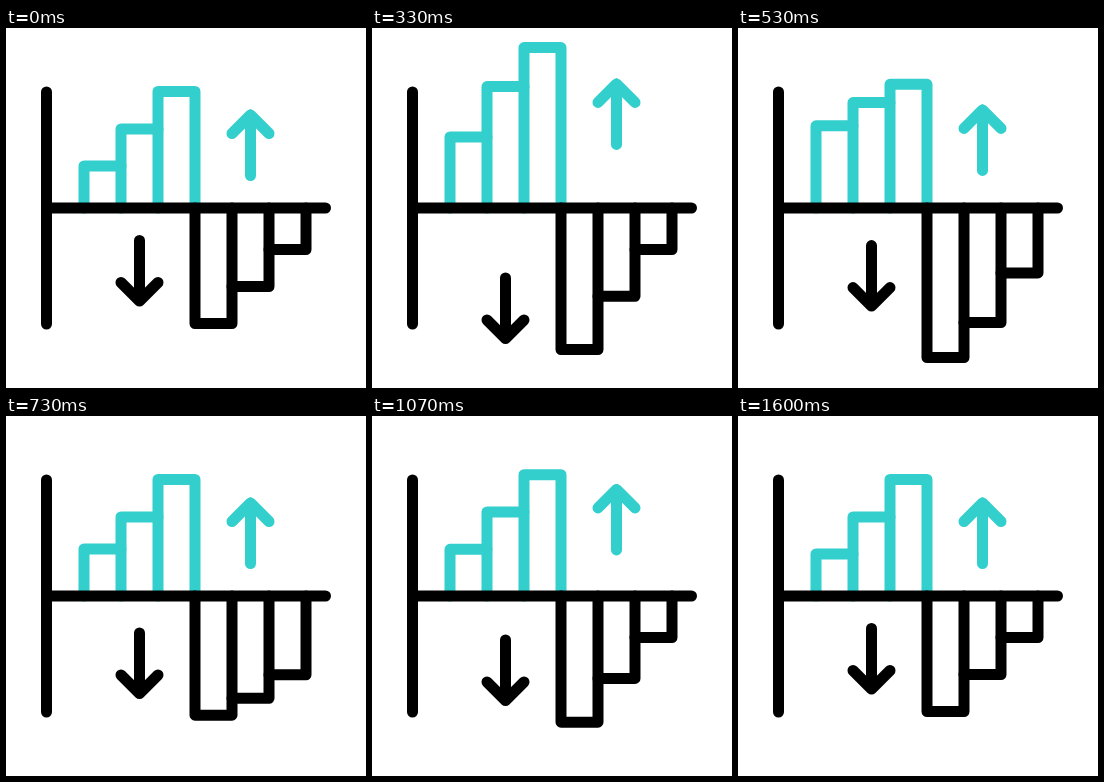
An HTML page for the animation above (1670 ms loop, 360x360 px).

```html
<!DOCTYPE html>
<html lang="en">
<head>
<meta charset="utf-8">
<style>
  html, body { margin: 0; width: 100%; height: 100%; overflow: hidden; background: #fff; }
  svg { display: block; width: 100vw; height: 100vh; }
  path { fill: none; stroke: #000; stroke-width: 11; stroke-linecap: round; stroke-linejoin: round; }
  .up { stroke: #33cfcd; }
</style>
</head>
<body>
<svg viewBox="0 0 360 360">
  <path class="up" id="low"/>
  <path class="up" id="mid"/>
  <path class="up" id="high"/>
  <path class="up" id="rise" d="M244.5 147.5V87M226 105.5L244.5 87L263 105.5"/>
  <path id="deep"/>
  <path id="half"/>
  <path id="shallow"/>
  <path id="fall" d="M133.5 212.5V273M115 254.5L133.5 273L152 254.5"/>
  <path d="M40.5 64V296M40.5 180H319.5"/>
</svg>
<script>
const LOOP = 1670;
const AXIS = 180;
const $ = id => document.getElementById(id);

// Each swing is [peak time, half duration, distance].
const bars = [
  { id: 'low', x: 78, y: 138, dir: -1, swings: [[466, 340, 44], [1130, 230, 5.5]] },
  { id: 'mid', x: 115, y: 101, dir: -1, swings: [[382, 335, 45], [1070, 230, 5]] },
  { id: 'high', x: 152, y: 63.5, dir: -1, closed: true, swings: [[310, 300, 44.5], [1020, 230, 5.5]] },
  { id: 'deep', x: 189, y: 295.5, dir: 1, closed: true, swings: [[460, 340, 38], [1130, 210, 13]] },
  { id: 'half', x: 226, y: 258.5, dir: 1, swings: [[577, 373, 37.5], [1200, 240, 9]] },
  { id: 'shallow', x: 263, y: 221.5, dir: 1, swings: [[690, 370, 38.5], [1320, 240, 4.5]] }
];
const arrows = [
  { id: 'rise', dir: -1, swings: [[310, 300, 31.5], [1040, 290, 14]] },
  { id: 'fall', dir: 1, swings: [[310, 290, 38], [950, 340, 16]] }
];

function offset({ dir, swings }, t) {
  return dir * swings.reduce((sum, [peak, half, size]) => {
    const u = Math.min(1, Math.abs(t - peak) / half);
    return sum + size * (1 + Math.cos(Math.PI * u)) / 2;
  }, 0);
}

function barPath({ x, y, dir, closed }, shift) {
  const end = x + 37;
  const top = (y + shift).toFixed(2);
  const left = dir < 0 || closed ? `M${x} ${AXIS}V${top}` : `M${x} ${top}`;
  const right = dir > 0 || closed ? `V${AXIS}` : '';
  return `${left}H${end}${right}`;
}

function draw(now) {
  const t = now % LOOP;
  for (const bar of bars) $(bar.id).setAttribute('d', barPath(bar, offset(bar, t)));
  for (const arrow of arrows) {
    $(arrow.id).setAttribute('transform', `translate(0 ${offset(arrow, t).toFixed(2)})`);
  }
  requestAnimationFrame(() => draw(performance.now() - start));
}

const start = performance.now();
draw(0);
</script>
</body>
</html>
```
